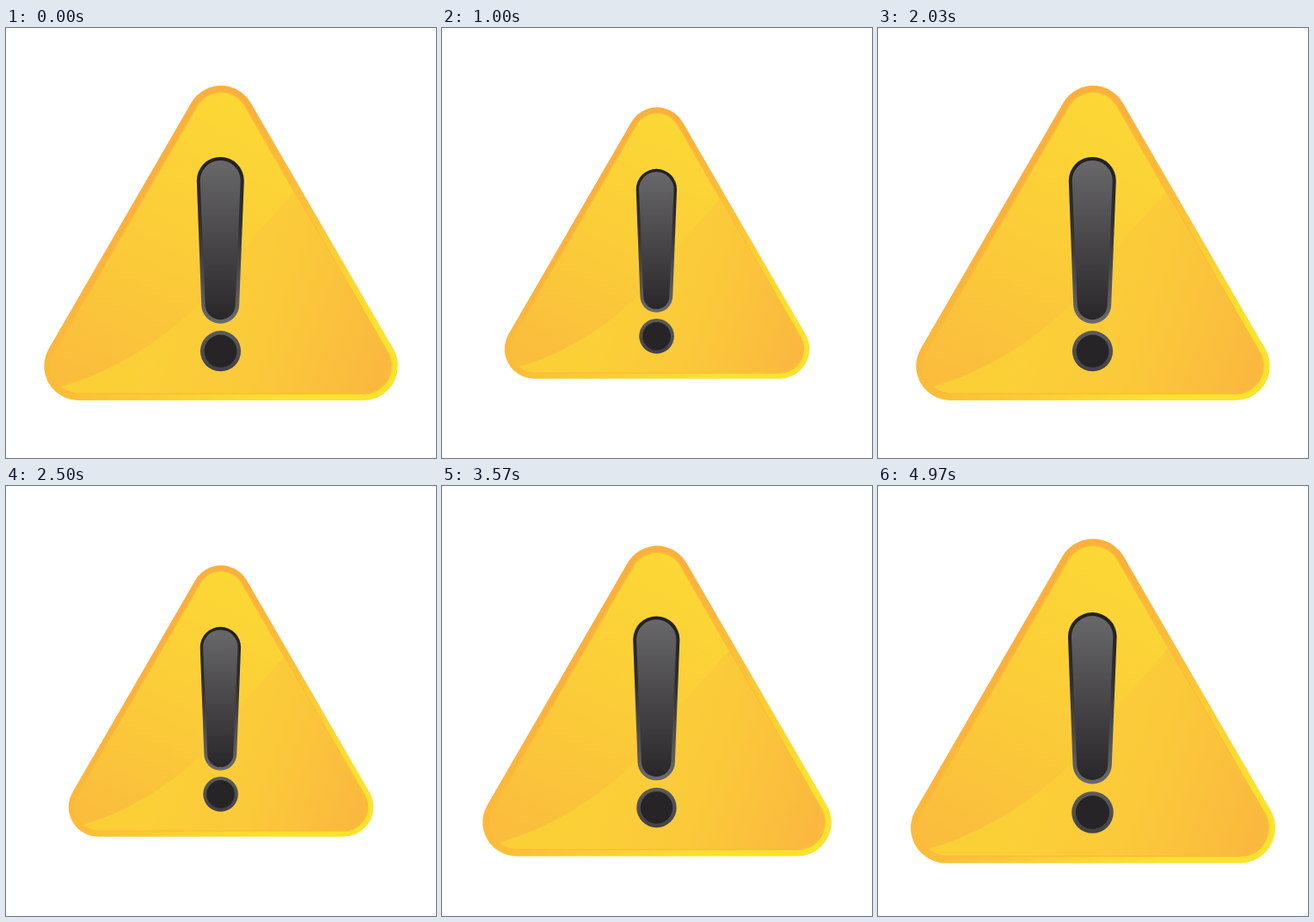
An HTML page that plays this animation: 500 by 500 pixels, repeating every 5.01 s.

```html
<!DOCTYPE html>
<html lang="en">
<head>
<meta charset="utf-8">
<title>Pulsing warning sign</title>
<style>
  html, body { margin: 0; height: 100%; overflow: hidden; background: #fff; }
  svg { display: block; width: 100vw; height: 100vh; }
  .tri { stroke-linejoin: round; }
</style>
</head>
<body>
<svg viewBox="0 0 500 500">
  <defs>
    <linearGradient id="rim" gradientUnits="userSpaceOnUse" x1="150" y1="200" x2="340" y2="420">
      <stop offset="0" stop-color="#fbb03b"/>
      <stop offset=".45" stop-color="#fbc038"/>
      <stop offset="1" stop-color="#fde22e"/>
    </linearGradient>
    <linearGradient id="edge" gradientUnits="userSpaceOnUse" x1="130" y1="200" x2="390" y2="350">
      <stop offset="0" stop-color="#fbbd3a"/>
      <stop offset="1" stop-color="#fbbb38"/>
    </linearGradient>
    <linearGradient id="face" gradientUnits="userSpaceOnUse" x1="270" y1="80" x2="110" y2="410">
      <stop offset="0" stop-color="#fbd834"/>
      <stop offset=".5" stop-color="#fbcd38"/>
      <stop offset="1" stop-color="#fabe3c"/>
    </linearGradient>
    <linearGradient id="sweep" gradientUnits="userSpaceOnUse" x1="170" y1="340" x2="420" y2="430">
      <stop offset="0" stop-color="#fbd037"/>
      <stop offset=".5" stop-color="#fbc93a"/>
      <stop offset="1" stop-color="#fab93e"/>
    </linearGradient>
    <linearGradient id="outline" gradientUnits="userSpaceOnUse" x1="0" y1="150" x2="0" y2="343">
      <stop offset="0" stop-color="#222022"/>
      <stop offset=".4" stop-color="#302e30"/>
      <stop offset="1" stop-color="#6a696b"/>
    </linearGradient>
    <linearGradient id="bar" gradientUnits="userSpaceOnUse" x1="0" y1="154" x2="0" y2="339">
      <stop offset="0" stop-color="#68676a"/>
      <stop offset="1" stop-color="#292729"/>
    </linearGradient>
    <linearGradient id="ring" x2="0" y2="1">
      <stop offset="0" stop-color="#5c5b5d"/>
      <stop offset="1" stop-color="#434143"/>
    </linearGradient>
    <path id="shape" class="tri" d="M84.3 393H415.7L250 107Z"/>
  </defs>
  <g id="sign">
    <use href="#shape" fill="url(#rim)" stroke="url(#rim)" stroke-width="80"/>
    <use href="#shape" fill="url(#edge)" stroke="url(#edge)" stroke-width="66"/>
    <use href="#shape" fill="url(#face)" stroke="url(#face)" stroke-width="63"/>
    <path fill="url(#sweep)" d="M64 417C150 393 225 330 260 280S312 220 334.4 190L443 377.3A31.5 31.5 0 0 1 415.7 424.5H84.3Q74 424 64 417Z"/>
    <path fill="url(#outline)" d="M221.8 177.5A27.5 27.5 0 0 1 276.8 177.5L271.2 321.7A22 22 0 0 1 227.2 321.7Z"/>
    <path fill="url(#bar)" d="M225.7 177.5A23.5 23.5 0 0 1 272.7 177.5L266.7 321.7A17.5 17.5 0 0 1 231.7 321.7Z"/>
    <circle cx="249.5" cy="375.7" r="23.6" fill="url(#ring)"/>
    <circle cx="249.5" cy="375.7" r="19" fill="#262426"/>
  </g>
</svg>
<script>
  const LOOP = 5010, STEP = 100 / 3, PULSE = 45;
  const LOW = 172, HIGH = 233, REST = 204.5;
  const sign = document.getElementById('sign');

  // Half width of the sign: eased shrink, then a steady growth.
  function halfWidth(step) {
    const p = (step + PULSE - 7) % PULSE;
    if (p === 0) return HIGH;
    const left = Math.max(0, 1 - (p - 0.9) / 30);
    const shrink = LOW + (HIGH - LOW) * left * left;
    const grow = HIGH - 4.07 * (PULSE - p);
    return Math.min(HIGH, Math.max(shrink, grow));
  }

  function draw() {
    const t = performance.now() % LOOP;
    const step = Math.min(149, Math.floor((t + 4) / STEP));
    const s = halfWidth(step) / REST;
    sign.setAttribute('transform', `translate(250 250) scale(${s}) translate(-250 -250)`);
    requestAnimationFrame(draw);
  }
  draw();
</script>
</body>
</html>
```
